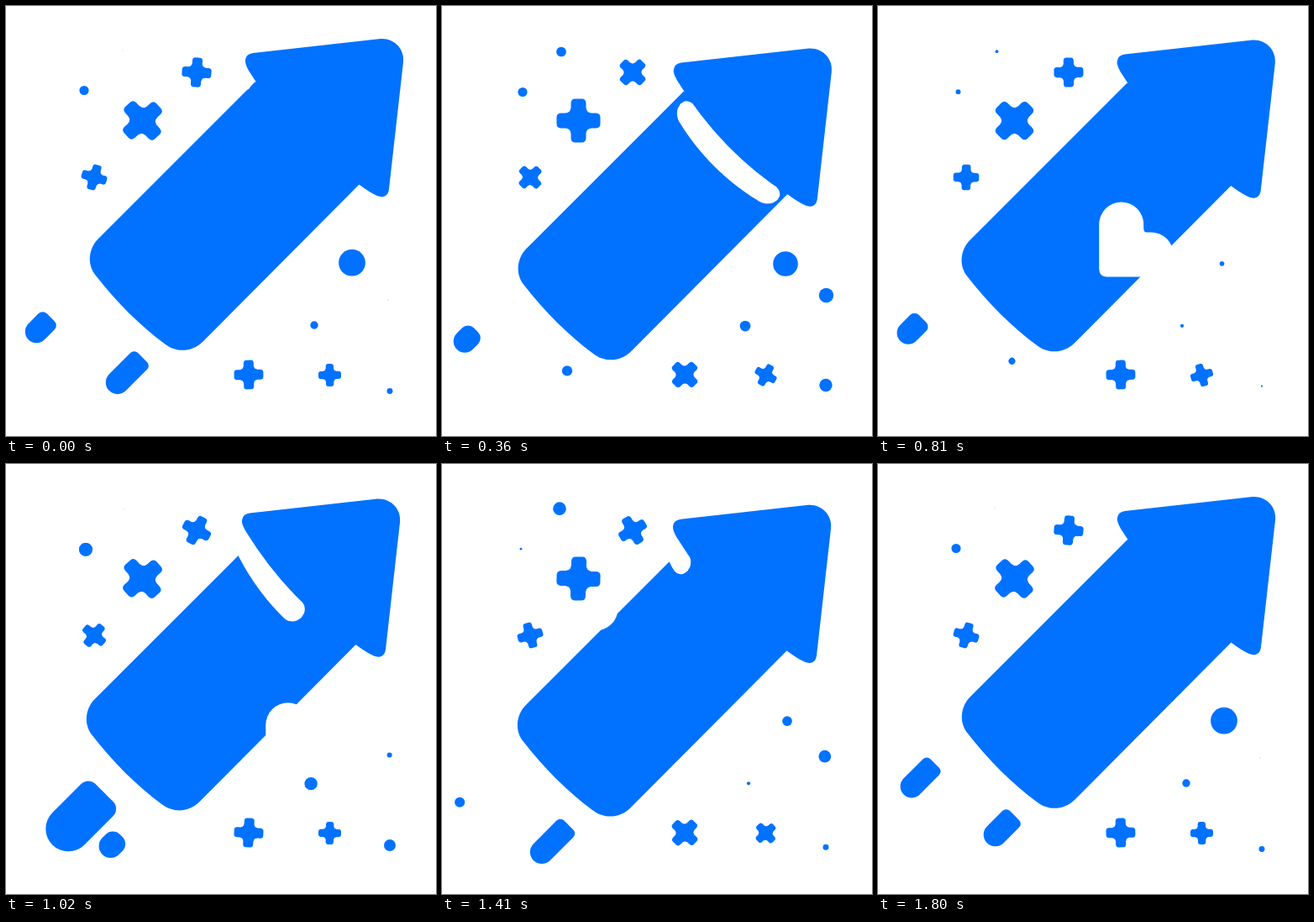
Animation of 512x512 px, one loop 1.83 s. Source, as an HTML page:

```html
<!DOCTYPE html>
<html lang="en">
<head>
<meta charset="utf-8">
<title>Rocket</title>
<style>
html, body { margin: 0; width: 100%; height: 100%; overflow: hidden; background: #fff; }
svg { display: block; width: 100vw; height: 100vh; fill: #0072ff; }
.cut { fill: #fff; }
</style>
</head>
<body>
<svg viewBox="0 0 512 512">
  <g id="rocket">
    <path d="M297 90L110 277C98 289 96 308 107 321C131 352 160 381 190 403C203 413 222 412 234 400L421 212L400 150Z"/>
    <g id="cuts" class="cut"></g>
    <path d="M294 56L446 39C462 38 475 51 473 67L456 218C455 226 450 229 442 226Q433 222 421 213Q342 163 289 77Q284 68 285 64Q286 57 294 56Z"/>
    <g id="flames"></g>
  </g>
  <g id="sparks"></g>
</svg>
<script>
// Times are counted in steps of 30 ms.
const STEP = 30, STEPS = 61, BEAT = 15;
const $ = id => document.getElementById(id);
const add = (parent, tag, attrs = {}) => {
  const el = parent.appendChild(document.createElementNS('http://www.w3.org/2000/svg', tag));
  for (const name in attrs) el.setAttribute(name, attrs[name]);
  return el;
};
const clamp = v => Math.min(1, Math.max(0, v));
const wave = turns => Math.cos(2 * Math.PI * turns);

// Sine easing between a few [time, value] points
function ease(points, t) {
  let [t0, v0] = points[0];
  for (const [t1, v1] of points) {
    if (t < t1) return v0 + (v1 - v0) * (1 - wave((t - t0) / (t1 - t0) / 2)) / 2;
    [t0, v0] = [t1, v1];
  }
  return v0;
}

const swayX = [[0, 0], [17, -11.4], [28, 0], [43, -11.4], [60, 0]];
const swayY = [[0, 0], [14.5, 12.4], [29, 1], [47, 9.8], [60, 0]];

// White ring under the head, placed by its leading end
const ring = add($('cuts'), 'path');
const ringReturn = [[28, -75], [34, 12], [42, -46], [52, -46], [58, -75]];
const ringLead = t => t < 27 ? 10 * t - 62 : ease(ringReturn, t);

function ringPath(lead) {
  const length = 115, cap = 10, top = [], bottom = [];
  for (let s = 0; s <= length; s++) {
    const m = lead - length + s;
    const inset = 1 - Math.min(s, length - s, cap) / cap;
    const half = (20.5 - 0.0008 * m * m) * Math.sqrt(1 - inset * inset);
    const middle = 174.5 + 0.0043 * m * m;
    const at = d => `${256 + m + d / 2} ${256 + m - d / 2}`;
    top.push(at(middle + half));
    bottom.unshift(at(middle - half));
  }
  return 'M' + top.concat(bottom).join('L') + 'Z';
}

// Heart sliding across the body, then peeking in again
const heart = add($('cuts'), 'path', {
  d: 'M204 199A26.5 26.5 0 0 1 257 199V204Q257 208.5 261 208.5H266A26.5 26.5 0 0 1 266 261.5H213Q204 261 204 252Z'
});
const heartPeek = [[38, -100], [42, -73], [52, -73], [58, -100]];
const heartShift = t => t < 38 ? 9.2 * (t - 20) - 0.1 * (t - 20) ** 2 : ease(heartPeek, t);

// Exhaust drops: the tip shoots out, then the tail catches up
const left = { sum: 424, every: STEPS / 4, from: 180, reach: 82, grow: 2.8, hold: 0.95, life: 5, radius: 13.5, slim: 0.5 };
const lanes = [
  { ...left, first: -3.15 },
  { ...left, first: -6.65 },
  { sum: 510, first: 13, every: 17.5, from: 180, reach: 97, grow: 3, hold: 3.25, life: 5.8, radius: 27, slim: 0.33 },
  { sum: 581, first: -3.95, every: STEPS / 4, from: 181, reach: 62, grow: 5.5, hold: 5, life: 10, radius: 14, slim: 0.5 }
];
for (const lane of lanes) {
  const mid = lane.sum / 2;
  lane.el = add($('flames'), 'path', { transform: `translate(${mid} ${mid}) rotate(135)` });
}

function dropPath({ first, every, from, reach, grow, hold, life, radius, slim }, t) {
  if (t < first) return '';
  const age = (t - first) % every;
  const a = from + reach * clamp((age - hold) / (life - hold));
  const b = from + reach * Math.sin(Math.PI / 2 * clamp(age / grow));
  const len = b - a;
  if (len < 0.5) return '';
  const r = Math.min(radius, len * slim);
  const c = Math.max(r * 0.45, r - (len - 2 * r) * 0.6);
  return `M${a + c} ${-r}H${b - r}A${r} ${r} 0 0 1 ${b - r} ${r}H${a + c}`
    + `A${c} ${c} 0 0 1 ${a} ${r - c}V${c - r}A${c} ${c} 0 0 1 ${a + c} ${-r}Z`;
}

// Crosses make an eased eighth of a turn on every beat
const arm = 'M-9 -15V-21Q-8.5 -26 -4 -26H4Q8.5 -26 9 -21V-15Q9.5 -9.5 15 -9L0 0L-15 -9Q-9.5 -9.5 -9 -15Z';
const crosses = [
  { x: 227, y: 79, size: 17.5, angle: 13, peak: 7 },
  { x: 162.5, y: 136.5, size: 26, angle: 45, peak: 12 },
  { x: 105, y: 204, size: 15.3, angle: 19, peak: 4.5 },
  { x: 289, y: 439, size: 17.4, angle: 0, peak: 11 },
  { x: 385.5, y: 439.5, size: 13.5, angle: -10, peak: 0 }
];
for (const cross of crosses) {
  cross.el = add($('sparks'), 'g');
  add(cross.el, 'rect', { x: -10, y: -10, width: 20, height: 20 });
  for (let turn = 0; turn < 360; turn += 90)
    add(cross.el, 'path', { d: arm, transform: `rotate(${turn})` });
}

// Dots pulse, vanishing at time "low", and drift by dx, dy
const dots = [
  { x: 96, y: 102.5, dx: -3, dy: -2, r: 8.5, low: 21, period: 30 },
  { x: 142, y: 54.5, dx: -3, dy: -2, r: 7.8, low: 2, period: 30 },
  { x: 409, y: 307, dx: 3, dy: -1.3, r: 17, low: 35, period: 60 },
  { x: 457.5, y: 344.5, dx: -2.5, dy: 5.5, r: 8.8, low: 28, period: 30 },
  { x: 361, y: 381, dx: 6, dy: -1, r: 8.5, low: 22, period: 30 },
  { x: 457, y: 451.5, dx: 0, dy: 7, r: 8.8, low: 23.5, period: 30 }
];
for (const dot of dots) dot.el = add($('sparks'), 'circle');

function draw(t) {
  $('rocket').setAttribute('transform', `translate(${ease(swayX, t)} ${ease(swayY, t)})`);
  ring.setAttribute('d', ringPath(ringLead(t)));
  const p = heartShift(t);
  heart.setAttribute('transform', `translate(${p} ${p})`);
  for (const lane of lanes) lane.el.setAttribute('d', dropPath(lane, t));
  for (const { el, x, y, size, angle, peak } of crosses) {
    const turn = angle + 45 * t / BEAT + 9 * wave((t - peak) / BEAT);
    el.setAttribute('transform', `translate(${x} ${y}) rotate(${turn}) scale(${size / 26})`);
  }
  const drift = Math.max(0, 1 - t / 12, (t - 20) / 40);
  for (const { el, x, y, dx, dy, r, low, period } of dots) {
    el.setAttribute('cx', x + dx * drift);
    el.setAttribute('cy', y + dy * drift);
    el.setAttribute('r', r * (1 - wave((t - low) / period)) / 2);
  }
}

let start;
function tick(now) {
  start ??= now;
  draw(Math.floor(Math.max(0, now - start) / STEP) % STEPS);
  requestAnimationFrame(tick);
}
draw(0);
requestAnimationFrame(tick);
</script>
</body>
</html>
```
